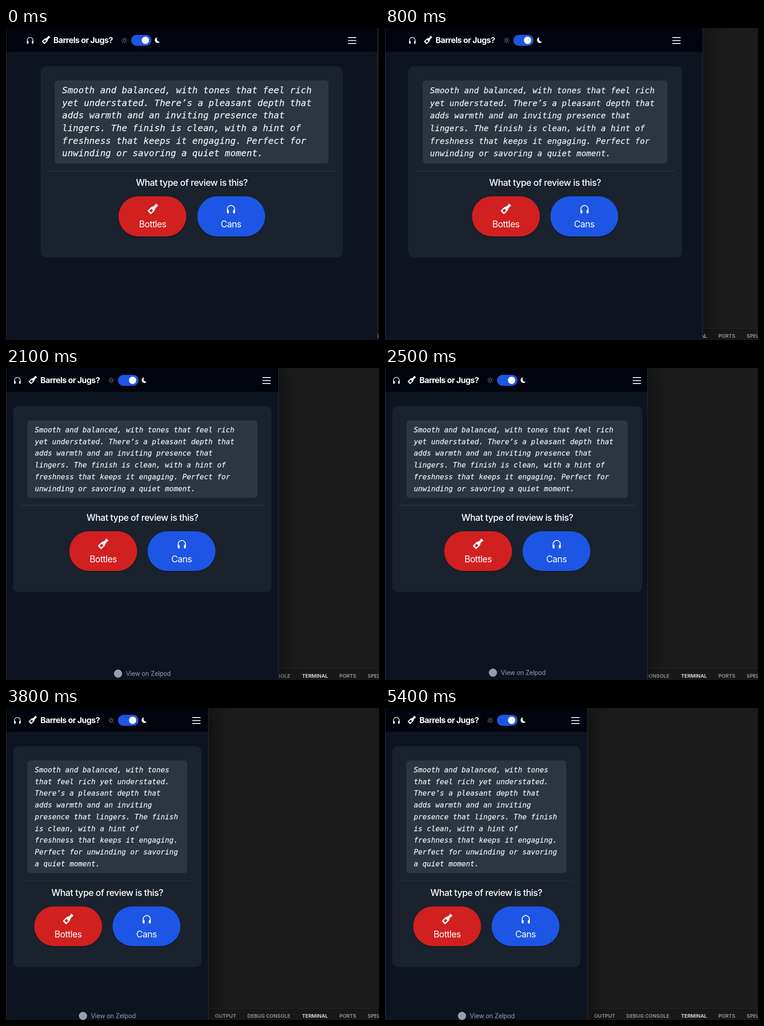
An HTML page that plays this animation: 819 px wide and 684 px high, repeating every 5500 ms.

```html
<!DOCTYPE html>
<html lang="en">
<head>
<meta charset="utf-8">
<title>Responsive quiz card</title>
<style>
  html, body { margin: 0; width: 100%; height: 100%; overflow: hidden; background: #1b1b1b; }
  body { position: relative; font: 19.76px Inter, sans-serif; letter-spacing: -.033em; color: #fff; }
  svg { display: block; fill: currentColor; }
  #panel { position: absolute; top: 658px; width: 100%; height: 26px; background: #181818;
    border-top: 1px solid #2a2a2a; font-size: 11px; font-weight: 600; letter-spacing: 0; color: #9a9a9a; }
  #panel span { position: absolute; line-height: 32px; white-space: nowrap; }
  #panel .on { color: #e6e6e6; }
  #window { position: absolute; left: 0; top: 0; height: 684px; overflow: hidden; box-sizing: border-box;
    background: #0e141f; box-shadow: 8px 0 32px #0007; }
  #window::after { content: ""; position: absolute; inset: 0; border: solid #26303d; border-width: 0 1px; }
  #page { position: absolute; height: 684px; }
  #bar { position: absolute; top: 0; width: 100%; height: 52px; background: #01030d; }
  #nav { position: relative; height: 52px; margin: auto; }
  #nav > * { position: absolute; }
  #title { left: 75.6px; top: 0; font-size: 17.8px; font-weight: 700; line-height: 54px; white-space: nowrap; }
  #toggle { left: 246px; top: 14.5px; width: 44.5px; height: 24px; border-radius: 12px; background: #1d56e4; }
  #toggle::after { content: ""; position: absolute; left: 23.5px; top: 4px; width: 16px; height: 16px;
    border-radius: 50%; background: #fff; }
  #menu { right: 18.5px; top: 19.5px; width: 18px; height: 2px; background: #f4f4f5;
    box-shadow: 0 6.5px #f4f4f5, 0 13px #f4f4f5; }
  #card { position: absolute; top: 83.5px; box-sizing: border-box; padding: 31.6px 15.8px 46px;
    border-radius: 12px; background: #1a222d; }
  #quote { margin: 0 15.8px; padding: 7.9px 15.8px; border-radius: 7px; background: #2c3641; color: #f0f2f4;
    font-family: "DejaVu Sans Mono", monospace; font-style: italic; letter-spacing: 0;
    -webkit-text-stroke: .25px; }
  #rule { margin: 15.2px 0 12.7px; height: 1.8px; background: #25313d; }
  #ask { font-weight: 500; line-height: 27.7px; letter-spacing: -.027em; text-align: center; white-space: nowrap; }
  #choices { display: flex; justify-content: center; gap: 23.2px; margin-top: 14.9px; }
  .choice { flex: none; width: 149px; height: 87.6px; border-radius: 44px; text-align: center;
    box-shadow: 0 1px 2px #0009; }
  .choice svg { margin: 16px auto 7px; }
  .choice div { line-height: 28px; }
  #footer { position: absolute; width: 100%; display: flex; justify-content: center; align-items: center;
    gap: 8px; height: 20px; font-size: 13.8px; letter-spacing: -.015em; color: #989ea8; }
  #footer i { width: 18px; height: 18px; border-radius: 50%; background: #989ea8; }
</style>
</head>
<body>
<svg width="0" height="0" style="position:absolute">
  <symbol id="phones" viewBox="0 0 20 20">
    <path d="M2 16V10a8 8 0 0 1 16 0v6" fill="none" stroke="currentColor" stroke-width="1.8"/>
    <rect x="1.1" y="11.5" width="4.2" height="8" rx="1.6"/>
    <rect x="14.7" y="11.5" width="4.2" height="8" rx="1.6"/>
  </symbol>
  <symbol id="bottle" viewBox="0 0 24 24">
    <path transform="translate(12 12) rotate(45)" fill-rule="evenodd"
      d="M-3.2-14h6.4v3.4H2.7v4.6C2.7-4 5.3-3.5 5.3 0V9.5Q5.3 11 3.8 11H-3.8Q-5.3 11-5.3 9.5V0C-5.3-3.5-2.7-4-2.7-6v-4.6h-.5zM-2.7 1.5V7.5H2.7V1.5z"/>
  </symbol>
</svg>

<div id="panel">
  <span style="left:459px">OUTPUT</span>
  <span style="left:530px">DEBUG CONSOLE</span>
  <span style="left:650px" class="on">TERMINAL</span>
  <span style="left:732px">PORTS</span>
  <span style="left:794px">SPELL CHECKER</span>
</div>

<div id="window">
  <div id="page">
    <div id="bar"><div id="nav">
      <svg style="left:16.5px;top:18.5px" width="16" height="16"><use href="#phones"/></svg>
      <svg style="left:49px;top:17px" width="19" height="19"><use href="#bottle"/></svg>
      <div id="title">Barrels or Jugs?</div>
      <svg style="left:224px;top:19.5px;color:#a3948f" width="14" height="14" viewBox="-7 -7 14 14">
        <g fill="none" stroke="currentColor"><circle r="3"/>
        <circle r="5.7" stroke-width="1.8" stroke-dasharray="1.2 3.277" stroke-dashoffset=".6"/></g>
      </svg>
      <div id="toggle"></div>
      <svg style="left:297px;top:20px" width="13" height="13" viewBox="0 0 13 13">
        <path d="M6.2.4A6.2 6.2 0 1 0 12 10.2A6.3 6.3 0 0 1 6.2.4z"/>
      </svg>
      <div id="menu"></div>
    </div></div>
    <div id="card">
      <div id="quote">Smooth and balanced, with tones that feel rich yet understated. There’s a pleasant depth that adds warmth and an inviting presence that lingers. The finish is clean, with a hint of freshness that keeps it engaging. Perfect for unwinding or savoring a quiet moment.</div>
      <div id="rule"></div>
      <div id="ask">What type of review is this?</div>
      <div id="choices">
        <div class="choice" style="background:#d12020">
          <svg width="24" height="24"><use href="#bottle"/></svg><div>Bottles</div>
        </div>
        <div class="choice" style="background:#1d56e4">
          <svg width="20" height="24"><use href="#phones"/></svg><div>Cans</div>
        </div>
      </div>
    </div>
    <div id="footer"><i></i><span>View on Zelpod</span></div>
  </div>
</div>

<script>
const LOOP = 5500, STEP = 100, LAG = 50, GAP = 15.8;
const MEDIUM = 759, SMALL = 632;

// [time, value] pairs
const dragWidth = [[0, 816], [50, 809], [150, 789], [250, 757], [350, 735], [450, 720], [550, 711],
  [750, 703], [800, 698], [1150, 657], [1260, 640], [1350, 634], [1450, 601], [1500, 600], [1700, 599],
  [2200, 599], [2600, 570], [2900, 530], [3050, 495], [3150, 467], [3200, 450], [3250, 445]];
const footerY = [[0, 720], [800, 704], [1400, 690], [1500, 671.5], [2100, 669.5], [3200, 666.5], [3300, 674.5]];

const $ = id => document.getElementById(id);

function along(points, t) {
  const i = points.findIndex(p => p[0] > t);
  if (i < 0) return points[points.length - 1][1];
  if (i === 0) return points[0][1];
  const [t0, a] = points[i - 1], [t1, b] = points[i];
  return a + (b - a) * (t - t0) / (t1 - t0);
}

// Font size eases over 300 ms after each breakpoint
function fade(t, start) {
  const x = Math.min(1, Math.max(0, (t - start) / 300));
  return x * x * (3 - 2 * x);
}

function render(t) {
  const layout = along(dragWidth, t - LAG);
  const medium = layout >= MEDIUM, small = layout >= SMALL;
  const container = medium ? MEDIUM : small ? SMALL : layout;
  const margin = medium ? 3 * GAP : GAP;

  $('window').style.width = along(dragWidth, t) + 'px';
  $('page').style.width = layout + 'px';
  $('nav').style.width = container + 'px';
  $('card').style.left = (layout - container) / 2 + margin + 'px';
  $('card').style.width = container - 2 * margin + 'px';
  $('quote').style.fontSize = 19.8 - 1.98 * (fade(t, 290) + fade(t, 1395)) + 'px';
  $('quote').style.lineHeight = small ? '27.66px' : '1.625';
  $('footer').style.top = along(footerY, t) - 10 + 'px';
}

function tick() {
  const t = performance.now() % LOOP;
  render(Math.floor(t / STEP) * STEP);
  requestAnimationFrame(tick);
}
tick();
</script>
</body>
</html>
```
